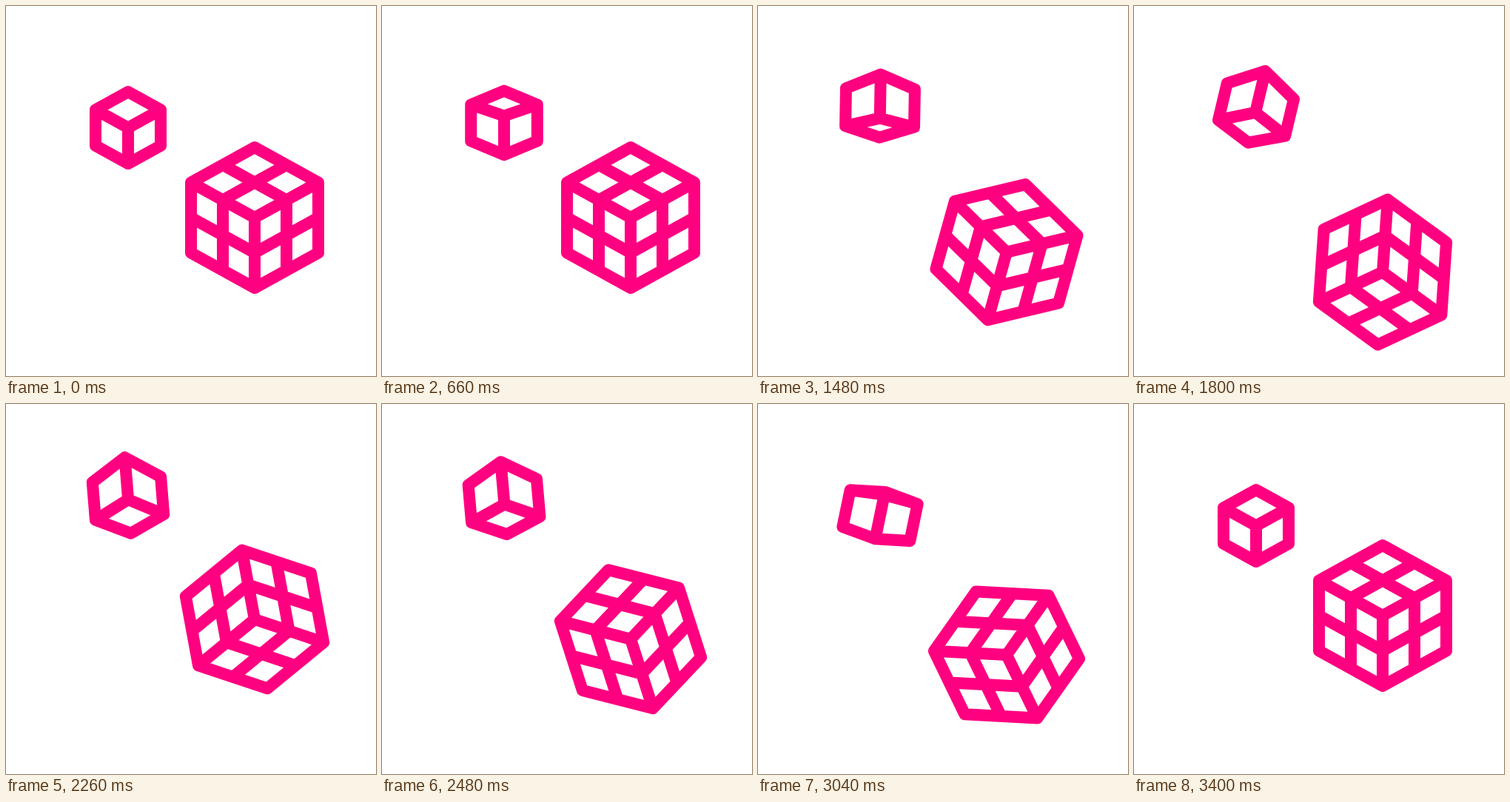
Recreate the animation shown at these times as an HTML page with a canvas. Size 500 px wide and 500 px high, loop 3600 ms.

```html
<!DOCTYPE html>
<html lang="en">
<head>
<meta charset="utf-8">
<title>Tumbling cubes</title>
<style>
  html, body { margin: 0; width: 100%; height: 100%; overflow: hidden; background: #fff; }
  canvas { display: block; width: 500px; height: 500px; }
</style>
</head>
<body>
<canvas id="stage" width="500" height="500"></canvas>
<script>
const ctx = document.getElementById('stage').getContext('2d');
const LOOP = 3600, STEP = 20, END = 3400;

const lerp = (a, b, u) => a + (b - a) * u;

// Eased progress from 0 to 1 between two times
function ease(t, from, to) {
  const u = Math.min(1, Math.max(0, (t - from) / (to - from)));
  return u * u * (3 - 2 * u);
}

function path(...points) {
  points.forEach(([x, y], i) => i ? ctx.lineTo(x, y) : ctx.moveTo(x, y));
}

function place(x, y, degrees, draw) {
  ctx.save();
  ctx.translate(x, y);
  ctx.rotate(degrees * Math.PI / 180);
  ctx.beginPath();
  draw();
  ctx.stroke();
  ctx.restore();
}

// Three faces around the middle corner, each split into four cells
function gridCube() {
  const edges = [[-86, -47.5], [86, -47.5], [0, 95]];
  edges.forEach((a, i) => {
    const b = edges[(i + 1) % 3];
    const at = (p, q) => [a[0] * p + b[0] * q, a[1] * p + b[1] * q];
    path(at(1, 0), at(1, 1), at(0, 1));
    for (const s of [0, 0.5]) {
      path(at(s, 0), at(s, 1));
      path(at(0, s), at(1, s));
    }
  });
}

// view: 1 = seen from above, 0 = level, -1 = seen from below
function plainCube(view) {
  const above = view > 0, u = Math.abs(view);
  const w = lerp(46.7, above ? 44 : 46.3, u);
  const h = lerp(25.5, above ? 24.2 : 25.5, u);
  const top = lerp(-31, above ? 0 : -55.5, u);
  const bottom = lerp(31, above ? 48.5 : 1.5, u);
  const far = above ? lerp(-31, -48.5, u) : lerp(31, 47.3, u);
  const inner = above ? top : bottom, side = above ? -h : h;
  path([-w, -h], [0, above ? far : top], [w, -h],
    [w, h], [0, above ? bottom : far], [-w, h]);
  ctx.closePath();
  path([-w, side], [0, inner], [w, side]);
  path([0, top], [0, bottom]);
}

// Two hops during one full turn
function drawGrid(t) {
  const y = 286
    + 80 * (ease(t, 1205, 1700) - ease(t, 2810, END))
    - 75 * (ease(t, 1700, 2257) - ease(t, 2257, 2810));
  place(336, y, 360 * ease(t, 1205, END), gridCube);
}

// Rises, tips until its underside shows, sways and settles back
function drawPlain(t) {
  const y = 164.5
    - 30 * ease(t, 450, 1140) + 5.5 * ease(t, 1140, 1800)
    - 12.7 * ease(t, 1800, 2300) + 23.3 * ease(t, 2300, 3040)
    + 13.9 * ease(t, 3040, END);
  const tilt = -12.6 * ease(t, 700, 1140) + 26 * ease(t, 1140, 1800)
    - 18.4 * ease(t, 1800, 2300) + 16.7 * ease(t, 2720, 3040)
    - 11.7 * ease(t, 3040, END);
  const view = 1 - 2 * ease(t, 220, 2020)
    + 1.08 * ease(t, 2340, 3040) + 0.92 * ease(t, 3040, END);
  place(165, y, tilt, () => plainCube(view));
}

function frame(now) {
  const t = Math.floor((now % LOOP) / STEP) * STEP;
  ctx.fillStyle = '#fff';
  ctx.fillRect(0, 0, 500, 500);
  ctx.strokeStyle = '#ff0080';
  ctx.lineWidth = 16;
  ctx.lineJoin = ctx.lineCap = 'round';
  drawGrid(t);
  drawPlain(t);
}

const start = performance.now();
function tick() {
  frame(performance.now() - start);
  requestAnimationFrame(tick);
}
tick();
</script>
</body>
</html>
```
